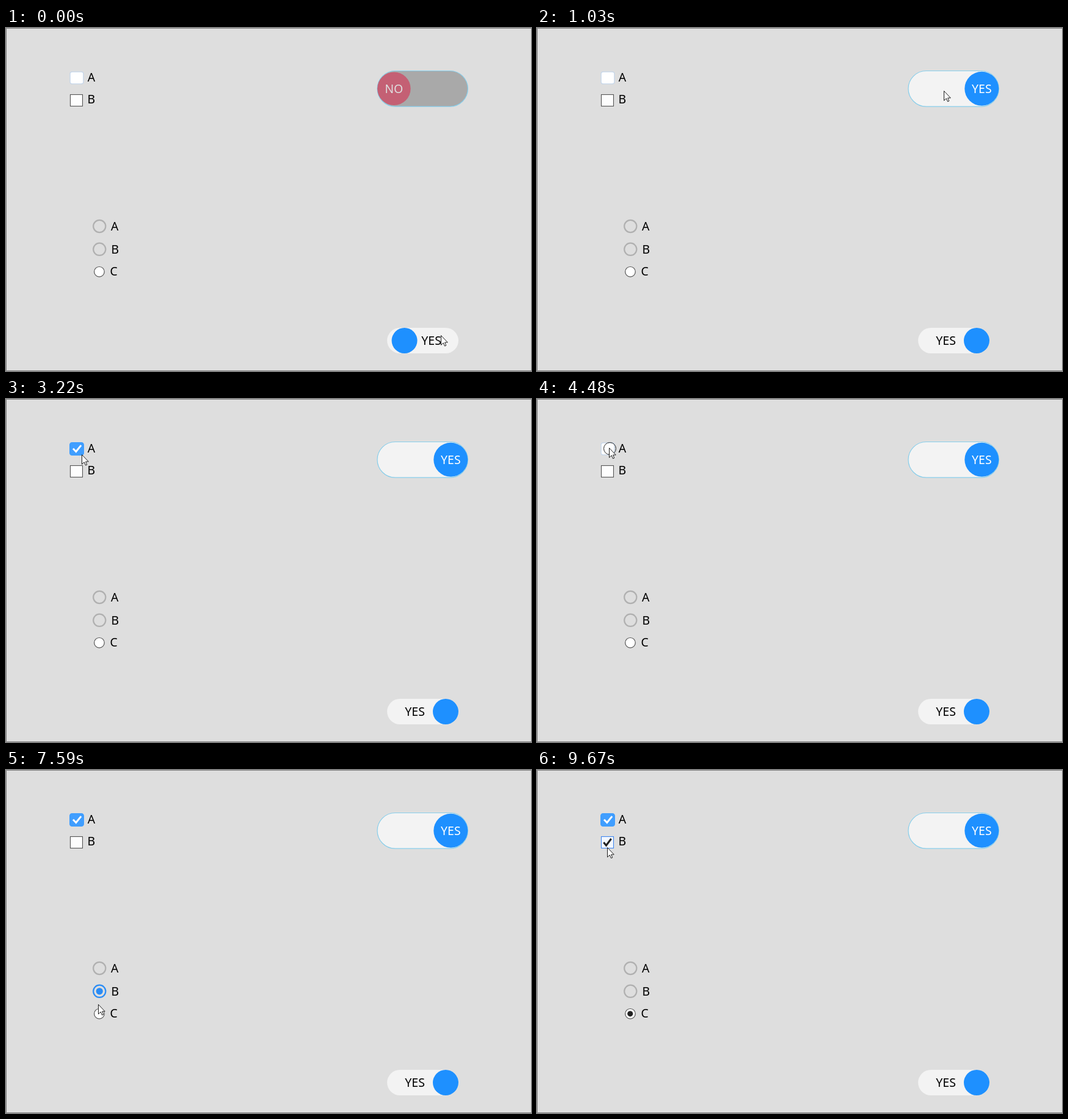
Recreate the animation shown at these times as an HTML page. Size 861 by 564 pixels, loop 9.73 s.

```html
<!DOCTYPE html>
<html lang="en">
<head>
<meta charset="utf-8">
<title>Toggle controls</title>
<style>
  html, body { margin: 0; width: 100%; height: 100%; overflow: hidden; background: #dedede; }
  svg { display: block; width: 861px; height: 564px; }
  text { font: 19.5px "Noto Sans", "Open Sans", sans-serif; fill: #000; }
  .mid { text-anchor: middle; }
  .ring { fill: none; stroke: #b0b0b0; stroke-width: 2.2; }
  .tick { fill: none; stroke-width: 3; }
</style>
</head>
<body>
<svg viewBox="0 0 861 564">
  <rect width="861" height="564" fill="#dedede"/>
  <path d="M861 .5H.5V563.5H861" fill="none" stroke="#808080"/>

  <rect id="track" x="608.9" y="70.5" width="148.6" height="58.6" rx="29.3" stroke="#87ceeb" stroke-width="1.2"/>
  <circle id="knob" cy="99.8" r="28"/>
  <text id="knobText" class="mid" y="107"></text>

  <rect x="625" y="493" width="117" height="42" rx="21" fill="#f3f3f3"/>
  <circle id="slider" cy="514" r="21" fill="#1e90ff"/>
  <text id="sliderText" class="mid" y="521">YES</text>

  <rect id="boxA"/>
  <path id="tickA" class="tick" d="M110 81.5l4.8 5 8.4-10.4" stroke="#fff"/>
  <text x="133.8" y="88">A</text>

  <rect id="boxB" x="105.5" y="109.5" width="20" height="19" stroke-width="1.1"/>
  <path id="tickB" class="tick" d="M109.3 119l4.2 5 8.2-11" stroke="#222"/>
  <text x="133.4" y="124">B</text>

  <circle class="ring" cx="153.3" cy="326" r="10.1"/>
  <text x="172" y="333">A</text>
  <circle id="ringB" class="ring" cx="153.3" cy="363.8" r="10.1"/>
  <circle id="dotB" cx="153.3" cy="363.8" r="5.6" fill="#2a8cf5"/>
  <text x="172.6" y="371">B</text>
  <circle id="ringC" cx="153" cy="400.8" r="8.3" stroke="#555" stroke-width="1.2"/>
  <circle id="dotC" cx="152.8" cy="400.8" r="4.6" fill="#222"/>
  <text x="170.6" y="407">C</text>

  <g id="cursor">
    <circle id="press" cx="1.5" cy="1.5" r="10" fill="none" stroke="#222"/>
    <path d="M.5 .6V16.3L4.2 12.8 6.6 18 8.8 17 6.6 12H11.3Z" fill="#fff" stroke="#111" stroke-width=".95"/>
  </g>
</svg>
<script>
  const LOOP = 9730, STEP = 60;
  const $ = id => document.getElementById(id);
  const set = (id, attrs) => {
    for (const name in attrs) $(id).setAttribute(name, attrs[name]);
  };
  const show = (id, on) => set(id, { visibility: on ? 'visible' : 'hidden' });
  const ease = p => p * p * p * (p * (6 * p - 15) + 10);

  // button down and up times
  const clicks = {
    toggle: [790, 1030],
    checkA: [2000, 3220], clearA: [3400, 3590], againA: [4480, 4660],
    pickB: [6270, 6520], pickC: [8200, 8380],
    checkB: [9420, 9670]
  };
  const held = (t, name) => t >= clicks[name][0] && t < clicks[name][1];
  const done = (t, name) => t >= clicks[name][1];

  // pointer stops: start time, steps, x, y, sideways bow of the path
  const stops = [
    [0, 1, 713, 505, 0], [60, 9, 667, 103, 18], [1150, 11, 130, 83, -32],
    [2370, 1, 130, 103, 0], [2430, 3, 130, 118, 0], [2800, 8, 124, 91, 0],
    [4230, 2, 118, 80, 0], [5050, 4, 141, 481, 10], [5480, 1, 142, 478, 0],
    [5540, 8, 151, 361, 13], [7590, 1, 151, 385, 0], [7650, 6, 151, 403, 0],
    [8630, 9, 115, 127, 14]
  ];

  function cursorAt(t) {
    const i = stops.filter(s => s[0] <= t).length - 1;
    const [start, steps, x, y, bow] = stops[i];
    const [, , x0, y0] = stops[Math.max(0, i - 1)];
    const p = ease(Math.min(1, (Math.floor((t - start) / STEP) + 1) / steps));
    const dx = x - x0, dy = y - y0;
    const side = bow * Math.sin(Math.PI * p) / (Math.hypot(dx, dy) || 1);
    return [x0 + dx * p - dy * side, y0 + dy * p + dx * side].map(Math.round);
  }

  function drawToggles(t) {
    const on = done(t, 'toggle');
    const cx = on ? 729.3 : 636.3;
    set('track', { fill: on ? '#f3f3f3' : '#a9a9a9' });
    set('knob', { cx, r: on ? 28 : 27.3, fill: on ? '#1e90ff' : '#c46074' });
    set('knobText', { x: cx, style: 'fill:' + (on ? '#fff' : '#dedede') });
    $('knobText').textContent = on ? 'YES' : 'NO';

    const p = Math.min(1, Math.floor(t / STEP) / 3);
    set('slider', { cx: 653.5 + 67.5 * p });
    set('sliderText', { x: 697.6 - 27 * p });
  }

  function drawBoxes(t, y) {
    const onA = ['checkA', 'clearA', 'againA'].filter(c => done(t, c)).length % 2 === 1;
    const downA = y < 95 && (held(t, 'checkA') || held(t, 'againA'));
    const bold = onA || (!downA && t >= 1690 && t < 5050);
    const line = bold ? 2 : 1.2, inset = bold ? 1 : 1.1;
    set('boxA', {
      x: 104 + inset, y: 71 + inset, width: 24 - 2 * inset, height: 22 - 2 * inset, rx: 3.3,
      'stroke-width': line, stroke: bold ? '#409eff' : '#c3d5ea', fill: onA ? '#409eff' : '#fff'
    });
    show('tickA', onA);

    const hoverB = t >= 5050 && y > 105 && y < 130;
    set('boxB', {
      stroke: hoverB ? '#3f86f0' : '#555',
      fill: held(t, 'checkB') ? '#d9e8fb' : hoverB ? '#f3f8ff' : '#fdfdfd'
    });
    show('tickB', done(t, 'checkB'));
  }

  function drawRadios(t) {
    const onC = done(t, 'pickC'), onB = done(t, 'pickB') && !onC;
    set('ringB', { style: onB ? 'stroke:#2a8cf5' : '' });
    show('dotB', onB);
    set('ringC', { fill: held(t, 'pickC') ? '#d9e8fb' : '#fff' });
    show('dotC', onC);
  }

  function draw(t) {
    const [x, y] = cursorAt(t);
    drawToggles(t);
    drawBoxes(t, y);
    drawRadios(t);
    set('cursor', { transform: `translate(${x},${y})` });
    show('press', Object.keys(clicks).some(name => held(t, name)));
  }

  const begin = performance.now();
  function tick() {
    draw((performance.now() - begin) % LOOP);
    requestAnimationFrame(tick);
  }
  tick();
</script>
</body>
</html>
```
